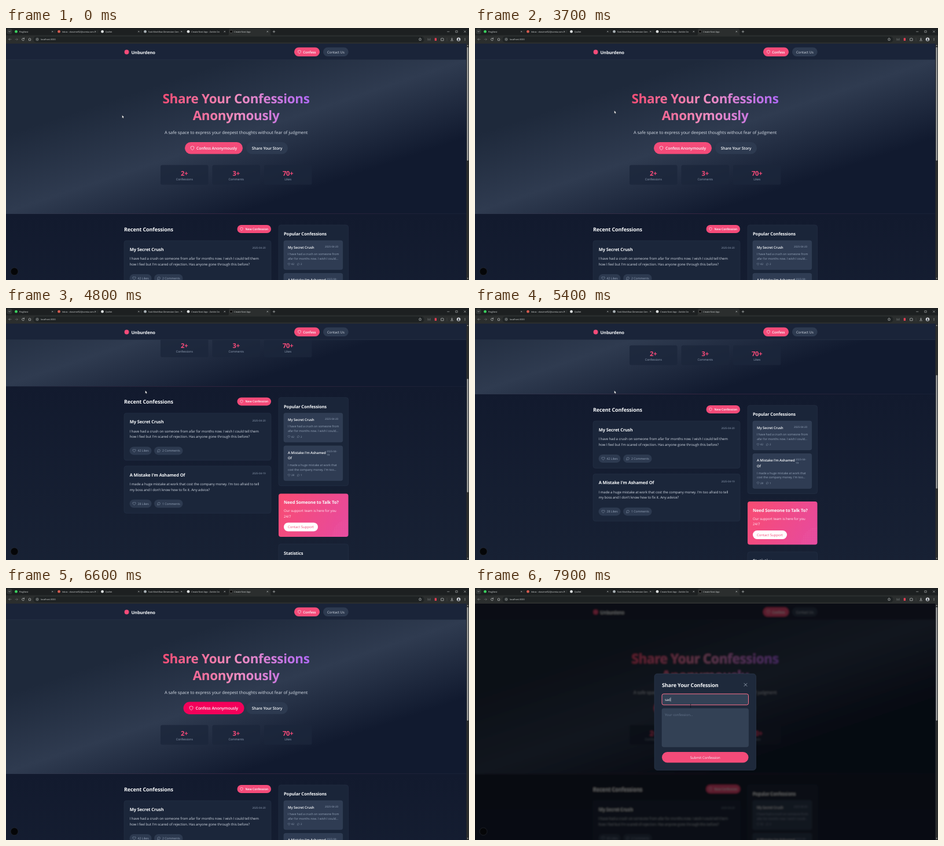
Recreate the animation shown at these times as an HTML page. Size 800x435 px, loop 8 s.

```html
<!DOCTYPE html>
<html lang="en">
<head>
<meta charset="utf-8">
<title>Confession board</title>
<style>
html, body { margin: 0; width: 100%; height: 100%; overflow: hidden; background: #0f172a; }
svg { display: block; width: 100vw; height: 100vh; }
text { font-family: "Open Sans", "Noto Sans", sans-serif; letter-spacing: -.008em; white-space: pre; text-rendering: geometricPrecision; }
.m { font-weight: 500; }
.s { font-weight: 600; letter-spacing: -.014em; }
.b { font-weight: 700; letter-spacing: -.014em; }
</style>
</head>
<body>
<svg id="stage" viewBox="0 0 800 435" xmlns="http://www.w3.org/2000/svg"></svg>
<script>
const PINK = '#f44b79', WHITE = '#f8fafc', SOFT = '#d3dae4', GREY = '#94a3b8', PILL = '#2d3a50';
const SHIELD = 'M12 22s8-4 8-10V5l-8-3-8 3v7c0 6 8 10 8 10z';
const HEART = 'M12 21C5 15 2 12 2 8a5.3 5.3 0 0 1 10-2.500a5.300 5.300 0 0 1 10 2.500c0 4-3 7-10 13z';
const BUBBLE = 'M21 11.500a8.400 8.400 0 0 1-12.400 7.400L3 21l1.900-5.700A8.400 8.400 0 1 1 21 11.500z';

const esc = s => s.replace(/&/g, '&amp;');
const rect = (x, y, w, h, r, fill, more = '') =>
  `<rect x="${x}" y="${y}" width="${w}" height="${h}" rx="${r}" fill="${fill}" ${more}/>`;
const circle = (x, y, r, fill, more = '') => `<circle cx="${x}" cy="${y}" r="${r}" fill="${fill}" ${more}/>`;
const line = (d, color, w = .6) =>
  `<path d="${d}" fill="none" stroke="${color}" stroke-width="${w}" stroke-linecap="round" stroke-linejoin="round"/>`;
// Sizes are nominal; the face in use runs slightly large.
const text = (x, y, size, str, fill = WHITE, cls = '', anchor = 'start') =>
  `<text x="${x}" y="${y}" font-size="${(size * .96).toFixed(2)}" fill="${fill}" class="${cls}" text-anchor="${anchor}">${esc(str)}</text>`;
const icon = (d, x, y, size, color) => `<g transform="translate(${x - size / 2} ${y - size / 2}) scale(${size / 24})">
  <path d="${d}" fill="none" stroke="${color}" stroke-width="2" stroke-linejoin="round"/></g>`;
const cross = (x, y, r, color, w) => line(`M${x - r} ${y - r}l${2 * r} ${2 * r}m0 ${-2 * r}l${-2 * r} ${2 * r}`, color, w);
const edge = c => `stroke="${c}" stroke-width=".5"`;

const gradient = (id, x1, y1, x2, y2, ...stops) =>
  `<linearGradient id="${id}" gradientUnits="userSpaceOnUse" x1="${x1}" y1="${y1}" x2="${x2}" y2="${y2}">` +
  stops.map((c, i) => `<stop offset="${i / (stops.length - 1)}" stop-color="${c}"/>`).join('') + '</linearGradient>';

const defs = `<defs>
  ${gradient('hero', 357, 66, 437, 308, '#1e293b', '#2f3b50', '#111a2f')}
  ${gradient('body', 0, 321, 0, 870, '#121a2e', '#1c2739')}
  ${gradient('head', 268, 0, 528, 0, '#f74c74', '#f08dbf', '#ae68f6')}
  ${gradient('rule', 0, 0, 796, 0, '#293449', '#8d3c66', '#253046')}
  ${gradient('help', 471, 506, 592, 580, '#f94c72', '#e64aa0')}
  <pattern id="dots" width="3" height="3" patternUnits="userSpaceOnUse"><circle cx="1" cy="1" r=".45" fill="#fff" opacity=".35"/></pattern>
  <filter id="blur" filterUnits="userSpaceOnUse" x="-10" y="10" width="820" height="440"><feGaussianBlur id="soft" stdDeviation="0"/></filter>
  <clipPath id="view"><path d="M0 27H795.500V435H0z"/></clipPath>
</defs>`;

function browser() {
  const ink = '#d5d8d8';
  const tabs = [
    [17.500, 'PingNest', '#3bd35f'],
    [91.500, 'Inbox - dravimel52@vomta.com...', '#d95c50'],
    [166.500, 'Quillet', '#dfe3e3'],
    [240.500, 'Task Workflow Dimension Gen', '#a9b1b5'],
    [315, 'Create Next App - Zorble Cin', '#e2e5e5'],
    [389, 'Create Next App', '#050505']
  ];
  let s = rect(0, 0, 800, 13.500, 0, '#1d2021') + rect(0, 12.500, 800, 14.500, 0, '#2b2e2e') +
    `<path d="M382 13q3 0 3-3V4q0-3 3-3h66q3 0 3 3v6q0 3 3 3z" fill="#2b2e2e"/>` +
    rect(1.500, 1.500, 9, 9, 3, '#303435') + line('M4.800 5.400l1.300 1.300l1.300-1.300', ink);
  tabs.forEach(([x, name, color], i) => {
    const end = x + 62.800;
    s += circle(x, 6.200, 2.400, color, i == 5 ? edge('#777') : '') +
      text(x + 5.300, 7.700, 3.950, name, ink) + cross(end, 6.200, 1, ink, .5);
    if (i < 4) s += rect(end + 4.300, 3.700, .4, 5, 0, '#505657');
  });
  s += line('M463 4.500v3.600m-1.800-1.800h3.600', ink);
  s += line('M762.500 6.300h3.400M777.200 4.700h3v3h-3z', ink, .5) + cross(793, 6.200, 1.500, ink, .5);
  s += rect(47.500, 14.700, 675, 10, 5, '#1e2223') + circle(54, 19.600, 3.500, '#333839') +
    circle(54, 19.600, 1.600, 'none', edge(ink)) + text(60, 21, 4.050, 'localhost:3000', ink);
  s += line('M9 19.600h-4.300m1.800-1.800l-1.800 1.800l1.800 1.800', '#838989') +
    line('M16 19.600h4.300m-1.800-1.800l1.800 1.800l-1.800 1.800', '#707676') +
    line('M31.300 18.500a2.100 2.100 0 1 0 .2 2M31.500 17v1.700h-1.700', ink) +
    line('M39 19.200l2-1.800l2 1.800M39.500 19v2.700h3V19', ink);
  s += line('M715.500 17.200l.7 1.600l1.800.2l-1.300 1.200l.3 1.700l-1.500-.9l-1.500.9l.3-1.700l-1.300-1.200l1.800-.2z', ink, .5) +
    line('M729 18v3.200m2-2.200v2.200m2-3.200v3.200', '#858b8b') +
    rect(740.700, 17.300, 3.300, 4.600, .5, '#e34055') +
    line('M752 18h1.200q.7-1.600 1.400 0H756v3.800h-4z', ink) +
    line('M762 17.200v5', '#565d5d', .4) + line('M770.500 17.200v3m-1.300-1.200l1.300 1.300l1.300-1.300M768.400 21.800h4.200', ink) +
    circle(782, 19.600, 3.200, '#d7dade') + circle(782, 18.900, 1.100, '#4a5058') + rect(780.300, 20.100, 3.400, 2, 1, '#4a5058');
  return s + [-1.700, 0, 1.700].map(d => circle(793, 19.600 + d, .5, ink)).join('');
}

function hero() {
  const stat = (x, n, label) => rect(x, 236.500, 82.500, 34, 3, '#1b263b', 'fill-opacity=".82"') +
    text(x + 41.250, 254.700, 11.700, n, PINK, 'b', 'middle') + text(x + 41.250, 263, 5.470, label, GREY, '', 'middle');
  return rect(0, 55, 796, 266, 0, 'url(#hero)') + rect(0, 320.700, 796, .7, 0, 'url(#rule)') +
    text(397.500, 129.700, 23.400, 'Share Your Confessions', 'url(#head)', 'b', 'middle') +
    text(397.500, 159.200, 23.400, 'Anonymously', 'url(#head)', 'b', 'middle') +
    text(397.700, 182.500, 7.810, 'A safe space to express your deepest thoughts without fear of judgment', SOFT, '', 'middle') +
    `<g id="cta">${rect(309, 197, 100, 20.500, 10.250, PINK, 'id="ctaBox"')}` +
    icon(SHIELD, 322, 207.300, 8, WHITE) + text(329, 210, 7.030, 'Confess Anonymously', WHITE, 's') + '</g>' +
    rect(415, 197, 72, 20.500, 10.250, PILL) + text(451, 210, 7.030, 'Share Your Story', WHITE, 's', 'middle') +
    stat(267, '2+', 'Confessions') + stat(356.500, '3+', 'Comments') + stat(446, '70+', 'Likes');
}

function post(y, title, date, lines, likes, comments) {
  const pill = (x, w, d, label) => rect(x, y + 58, w, 14, 7, PILL) + icon(d, x + 8, y + 65, 6.300, GREY) +
    text(x + 14, y + 66.900, 5.470, label, GREY);
  return rect(204, y, 254, 81.500, 4, '#1b263a', edge('#28354a')) +
    text(213.700, y + 17.800, 7.810, title, WHITE, 'b') + text(448.500, y + 14.300, 4.690, date, GREY, '', 'end') +
    lines.map((l, i) => text(213.700, y + 33.300 + i * 9.600, 6.250, l, SOFT)).join('') +
    pill(213.500, 38, HEART, likes + ' Likes') + pill(256, 49.500, BUBBLE, comments);
}

function popular(y, h, titles, dates, lines, likes, comments) {
  const base = y + h;
  return rect(480, y, 101.700, h, 3, '#2f3c53', edge('#3b495f')) +
    titles.map((l, i) => text(487, y + 13.700 + i * 9.300, 6.250, l, WHITE, 's')).join('') +
    dates.map((l, i) => text(dates.length > 1 ? 554 : 551, y + 11.600 + i * 5.800, 4.690, l, GREY)).join('') +
    lines.map((l, i) => text(487, base - 25 + i * 7.900, 5.470, l, GREY)).join('') +
    icon(HEART, 489, base - 9.300, 4.700, GREY) + text(493, base - 7.600, 4.690, likes, GREY) +
    icon(BUBBLE, 505, base - 9.300, 4.700, GREY) + text(509, base - 7.600, 4.690, comments, GREY);
}

function feed() {
  const panel = (y, h) => rect(471, y, 120.500, h, 4, '#1a2539', edge('#28354a'));
  return rect(0, 321, 796, 560, 0, 'url(#body)') +
    text(204, 350.700, 9.370, 'Recent Confessions', WHITE, 'b') +
    rect(399.500, 340, 58.500, 14, 7, PINK) + icon(SHIELD, 407, 347, 6.300, WHITE) +
    text(413.500, 349, 5.470, 'New Confession', WHITE, 's') +
    post(367, 'My Secret Crush', '2025-04-20', [
      'I have had a crush on someone from afar for months now. I wish I could tell them',
      "how I feel but I'm scared of rejection. Has anyone gone through this before?"], 42, '2 Comments') +
    post(458.400, "A Mistake I'm Ashamed Of", '2025-04-19', [
      "I made a huge mistake at work that cost the company money. I'm too afraid to tell",
      "my boss and I don't know how to fix it. Any advice?"], 28, '1 Comments') +
    panel(340, 152.500) + text(480, 358.300, 7.810, 'Popular Confessions', WHITE, 'b') +
    popular(367, 50, ['My Secret Crush'], ['2025-04-20'],
      ['I have had a crush on someone from', 'afar for months now. I wish I could...'], '42', '2') +
    popular(423.500, 60, ["A Mistake I'm Ashamed", 'Of'], ['2025-04-', '19'],
      ['I made a huge mistake at work that', "cost the company money. I'm too..."], '28', '1') +
    rect(471, 506, 120.500, 74.500, 4, 'url(#help)') + `<path d="M591.500 550v30H564q1-26 27.500-30z" fill="url(#dots)"/>` +
    text(480, 523.800, 7.810, 'Need Someone to Talk To?', WHITE, 'b') +
    text(480, 538, 6.250, 'Our support team is here for you', '#ffeaf2') + text(480, 547.300, 6.250, '24/7', '#ffeaf2') +
    rect(480, 556, 59, 15, 7.500, '#fff') + text(509.500, 565.800, 6.250, 'Contact Support', PINK, 'm', 'middle') +
    panel(593, 120) + text(480, 611.300, 7.810, 'Statistics', WHITE, 'b');
}

const header = () => rect(-10, 15, 820, 40, 0, '#1a2439') + rect(0, 54.600, 796, .5, 0, '#2d394d') +
  circle(208.500, 41.500, 3.900, PINK) + text(216.500, 44.500, 7.810, 'Unburdeno', WHITE, 'b') +
  rect(498, 33.500, 44, 15.500, 7.750, PINK) + icon(SHIELD, 507, 41.300, 7, WHITE) + text(513.300, 43.600, 6.250, 'Confess', WHITE, 's') +
  rect(548, 33.500, 43.700, 15.500, 7.750, PILL) + text(569.800, 43.600, 6.250, 'Contact Us', SOFT, 'm', 'middle');

const modal = () => rect(310, 148, 175.500, 166.500, 5, '#1e293b', edge('#334155')) +
  text(323, 170.700, 9.370, 'Share Your Confession', WHITE, 'b') + cross(467.500, 167, 2.400, '#a9b5c5', .8) +
  rect(323, 182.800, 149.500, 19, 3, '#334155', 'id="field"') +
  text(328, 194.600, 6.250, 'Title', '#64748b').replace('<text', '<text id="typed"') +
  line('M338.300 189.300v6.400', WHITE, .5).replace('<path', '<path id="caret"') +
  rect(323, 208, 149.500, 66.300, 3, '#334155', edge('#3c4a5f')) + text(328, 220.500, 6.250, 'Your confession...', '#64748b') +
  rect(323, 283, 149.500, 18.500, 9.250, PINK) + text(397.700, 294.500, 6.250, 'Submit Confession', WHITE, 'm', 'middle');

const scrollbar = () => rect(795.500, 27, 4.500, 408, 0, '#2b2d2d') + rect(796.500, 33, 2.400, 196, 1.200, '#a0a2a2', 'id="thumb"') +
  '<path d="M796.400 31l1.300-2l1.300 2zM796.400 431.500l1.300 2l1.300-2z" fill="#a0a2a2"/>';

const stage = document.getElementById('stage');
stage.innerHTML = defs + rect(0, 0, 800, 435, 0, '#121a2e') +
  `<g clip-path="url(#view)"><g id="page"><g id="doc">${hero()}${feed()}</g>${header()}</g>
   <rect id="shade" y="27" width="796" height="408" fill="#000"/><g id="modal">${modal()}</g></g>` +
  scrollbar() + browser() + circle(14.500, 420.300, 6.500, '#050608', edge('#30363f')) +
  '<path id="arrow" d="M0 0v4.900l1.100-1l.8 1.700l.8-.4l-.8-1.600h1.500z" fill="#fff" stroke="#111" stroke-width=".25"/>' +
  '<path id="beam" d="M371.500 200.500h2m-1 0v5.500m-1 0h2" fill="none" stroke="#0b1220" stroke-width=".6"/>';

const el = Object.fromEntries([...stage.querySelectorAll('[id]')].map(n => [n.id, n]));
const clamp = v => Math.max(0, Math.min(1, v));
const span = (t, a, b) => clamp((t - a) / (b - a));
const smooth = u => u * u * (3 - 2 * u);
const wheel = (t, start) => smooth(Math.pow(span(t, start, start + 570), .6));
const set = (n, attrs) => { for (const k in attrs) n.setAttribute(k, attrs[k]); };

// [start, end, x, y]: the pointer eases to x, y between start and end
const moves = [
  [1399, 1400, 200.200, 149.800], [2199, 2200, 199.700, 149], [2499, 2500, 200.200, 148.800], [2799, 2800, 199.700, 149],
  [2999, 3000, 199, 146.500], [3330, 3700, 240.700, 142.600], [6030, 6500, 371, 205]
];
function pointer(t) {
  let x = 200.700, y = 150.500;
  for (const [a, b, nx, ny] of moves) {
    const u = smooth(span(t, a, b));
    x += (nx - x) * u;
    y += (ny - y) * u;
  }
  return [x, y];
}

function draw(t) {
  const scroll = 214 * (wheel(t, 4430) - wheel(t, 5330));
  set(el.doc, { transform: `translate(0 ${-scroll})` });
  set(el.thumb, { y: 33 + scroll * .481 });

  const open = span(t, 6650, 6870);
  const hover = span(t, 6400, 6600) * (1 - open);
  set(el.cta, { transform: `translate(359 207.250) scale(${1 + .05 * hover}) translate(-359 -207.250)` });
  set(el.ctaBox, { fill: `rgb(244 ${75 - 75 * hover} ${121 - 31 * hover})` });

  open > 0 ? set(el.page, { filter: 'url(#blur)' }) : el.page.removeAttribute('filter');
  set(el.soft, { stdDeviation: 1.800 * open });
  set(el.shade, { opacity: .62 * open });
  const grow = .95 + .05 * open;
  set(el.modal, { opacity: open, transform: `translate(397.750 231) scale(${grow}) translate(-397.750 -231)` });

  const focus = span(t, 7200, 7400);
  set(el.field, { stroke: focus ? '#fb6f89' : '#3c4a5f', 'stroke-width': .5 + .5 * focus });
  const typed = 'sad'.slice(0, t < 7600 ? 0 : Math.floor((t - 7500) / 100));
  el.typed.textContent = typed || 'Title';
  set(el.typed, { fill: typed ? WHITE : '#64748b' });
  const end = typed ? el.typed.getComputedTextLength() : 0;
  set(el.caret, { opacity: focus ? 1 : 0, transform: `translate(${end - 10} 0)` });

  const [x, y] = pointer(t);
  set(el.arrow, { transform: `translate(${x} ${y})`, opacity: t < 6500 ? 1 : 0 });
  set(el.beam, { opacity: t >= 7100 ? 1 : 0 });
}

function tick() {
  draw(Math.floor(performance.now() % 8000 / 100) * 100);
  requestAnimationFrame(tick);
}
tick();
</script>
</body>
</html>
```
